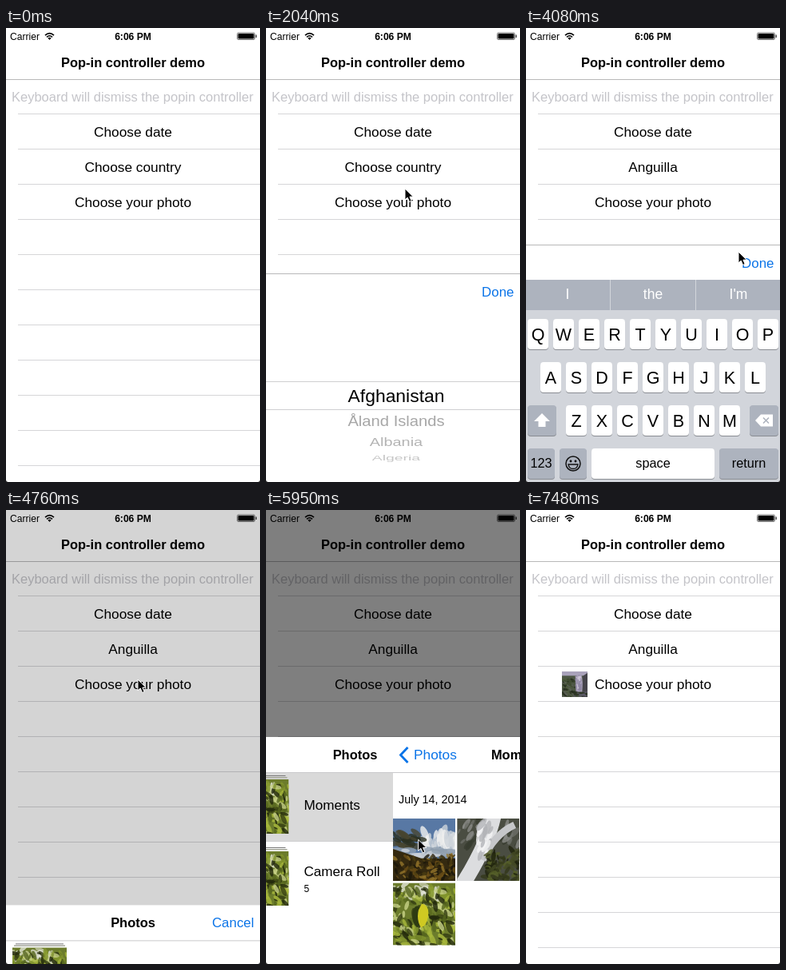
Write an HTML page that moves like this. It is 318x568 px and loops after 7650 ms.

```html
<!DOCTYPE html>
<html lang="en">
<head>
<meta charset="utf-8">
<title>Pop-in controller demo</title>
<style>
html, body { margin: 0; width: 100%; height: 100%; overflow: hidden; background: #fff; }
svg { display: block; width: 100vw; height: 100vh; font-family: "Liberation Sans", Arial, sans-serif; }
</style>
</head>
<body>
<svg id="stage" viewBox="0 0 318 568"></svg>
<script>
const W = 318, H = 568, LOOP = 7650, STEP = 170;
const BLUE = '#0b74e8', GREY = '#adb3be', RULE = '#cfcfd1', PRESSED = '#d9d9d9';

// Markup helpers
const rect = (x, y, w, h, fill, more = '') =>
  `<rect x="${x}" y="${y}" width="${w}" height="${h}" fill="${fill}" ${more}/>`;
const label = (s, x, y, size = 17.3, anchor = 'middle', fill = '#000', more = '') =>
  `<text x="${x}" y="${y}" font-size="${size}" text-anchor="${anchor}" fill="${fill}" ${more}>${s}</text>`;
const title = (s, y) => label(s, 159, y, 16.45, 'middle', '#000', 'font-weight="bold"');
const line = (x, y, color) => rect(x, y, W - x, 1, color);
const path = (d, fill, more = '') => `<path d="${d}" fill="${fill}" ${more}/>`;
const stroke = (d, color, width) => path(d, 'none', `stroke="${color}" stroke-width="${width}"`);
const circle = (x, y, r, more = '') => `<circle cx="${x}" cy="${y}" r="${r}" ${more}/>`;
const group = (id, body) => `<g id="${id}">${body}</g>`;
const count = (n, first) => Array.from({ length: n }, (_, i) => first + i);

// Photos: scattered leaves, rocks and streaks in a 78 x 78 box
let seed = 11;
const rand = () => (seed = (seed * 16807) % 2147483647) / 2147483647;
function scatter(n, colors, [x, y, w, h], r, tilt = 0, spread = 180) {
  return count(n, 0).map(i => {
    const cx = x + rand() * w, cy = y + rand() * h, rx = r * (.5 + rand());
    const turn = tilt + (rand() - .5) * spread;
    return `<ellipse rx="${rx}" ry="${rx * .4}" fill="${colors[i % colors.length]}" opacity=".8" ` +
      `transform="translate(${cx} ${cy}) rotate(${turn})"/>`;
  }).join('');
}
const PHOTOS = {
  river: () => rect(0, 0, 78, 78, '#5878a4') +
    scatter(30, ['#f0f0ef', '#cdd3da'], [38, 18, 40, 22], 8, 90, 60) +
    scatter(24, ['#2b2f20', '#47452f'], [0, 17, 34, 18], 7, 20, 40) +
    scatter(24, ['#c9d0d8', '#8f9eae'], [6, 39, 72, 8], 9, 0, 10) +
    path('M0 38L36 50H78V78H0Z', '#352a10') +
    scatter(110, ['#2a210c', '#6b4f16', '#4b3d12', '#94742a', '#1a170a'], [0, 46, 78, 32], 4),
  stream: () => rect(0, 0, 78, 78, '#4a4d42') +
    scatter(40, ['#6c6f68', '#383c30', '#8a8b88'], [0, 0, 78, 36], 6, 120, 40) +
    stroke('M46 -4Q38 34 6 84', '#dcdddf', 19) + stroke('M72 8Q46 20 32 52', '#c6c7ca', 9) +
    scatter(30, ['#f4f4f5', '#b3b4b8'], [28, 4, 14, 46], 7, 115, 30) +
    scatter(90, ['#33381a', '#1f220d', '#565f28', '#454b25'], [36, 40, 42, 38], 5),
  falls: () => rect(0, 0, 78, 78, '#4d5744') + rect(0, 0, 78, 13, '#a9a2ba') +
    stroke('M50 12Q55 34 52 64', '#a59cb6', 20) +
    scatter(34, ['#cfc8db', '#8f87a2'], [44, 18, 14, 36], 8, 90, 16) +
    path('M64 14L78 4V78H62Z', '#45444a') +
    scatter(80, ['#3f4b31', '#232b1b', '#4f5b3e', '#5d6158'], [0, 24, 38, 54], 6, 30, 50) +
    scatter(24, ['#2b3322', '#5d5a68'], [36, 62, 42, 16], 6, 10, 40),
  meadow: () => rect(0, 0, 78, 78, '#d9d8de') +
    scatter(40, ['#8d9086', '#6d7263'], [28, 34, 50, 10], 7, -10, 20) + rect(0, 46, 78, 32, '#4f5c2a') +
    scatter(130, ['#73843c', '#38431c', '#8d9650', '#6a4a2c'], [0, 44, 78, 36], 6, 85, 50) +
    stroke('M6 48L20 6M16 48L8 12M26 44L38 18', '#77786c', .8) +
    scatter(4, ['#f1f2df'], [50, 49, 4, 3], 5, 0, 20),
  leaves: () => rect(0, 0, 78, 78, '#6c7c2c') +
    scatter(26, ['#e2e4d8', '#c3c9a8'], [0, 0, 60, 18], 7) +
    scatter(190, ['#a9b93c', '#343d12', '#83952e', '#20260b', '#c9d287', '#55661f'], [0, 8, 78, 70], 6, 60, 120) +
    path('M25 34Q30 24 36 34Q38 50 30 56Q22 48 25 34Z', '#2e3b12') +
    path('M36 26Q46 28 44 42Q42 54 35 56Q29 46 32 34Z', '#cfc922')
};
const photo = (id, x, y, size) => `<use href="#${id}" x="${x}" y="${y}" width="${size}" height="${size}"/>`;

// Status bar, navigation bar and table
const base = () => label('Carrier', 5, 14.5, 12.1, 'start') +
  stroke('M49 9.2Q54.5 4.2 60 9.2M51 11.3Q54.5 8.2 58 11.3', '#000', 1.6) +
  path('M52.3 12.5Q54.5 11 56.7 12.5L54.5 15Z', '#000') +
  label('6:06 PM', 159, 14.5, 12.1, 'middle', '#000', 'font-weight="bold"') +
  rect(289.5, 6, 22, 8.5, '#fff', 'rx="1.5" stroke="#777"') +
  rect(290.5, 7, 20, 6.5, '#000', 'rx="1"') + rect(312.5, 8.5, 1.5, 3.5, '#555') +
  title('Pop-in controller demo', 48.5) + line(0, 64, '#b8b8b9') +
  label('Keyboard will dismiss the popin controller', 7, 92, 16.5, 'start', '#c4c4c9') +
  rect(0, 108, W, 43, PRESSED, 'id="press"') +
  count(11, 0).map(i => line(15, 107 + 44 * i, '#d6d6d8')).join('') +
  label('Choose date', 159, 136) + label('Choose country', 159, 180, 17.3, 'middle', '#000', 'id="country"') +
  label('Choose your photo', 159, 224) + group('chosen', photo('falls', 45, 202, 32));

// Rotating picker column, magnified inside the middle band
function wheel(items, pos, x, anchor = 'middle') {
  let small = '', big = '';
  items.forEach((s, i) => {
    const a = (i - pos) * .361, c = Math.cos(a), y = 87.7 * Math.sin(a);
    if (Math.abs(a) > 1.4) return;
    const size = 18.6 + 1.7 * c;
    small += label(s, 0, size * .36, size, anchor, '#999',
      `opacity="${.25 + .65 * c}" transform="translate(${x} ${153 + y}) scale(1 ${c})"`);
    big += label(s, x, 161.3 + y * 1.12, 22.9, anchor);
  });
  return `<g clip-path="url(#around)">${small}</g><g clip-path="url(#band)">${big}</g>`;
}

const panel = fill => rect(0, 0, W, 300, fill);
const toolbar = () => rect(0, 0, W, 44, '#fff') + line(0, 0, '#b8b8b9') + label('Done', 310.5, 29, 16.9, 'end', BLUE);

const MONTHS = ['April', 'May', 'June', 'July', 'August', 'September', 'October'];
const picker = () => panel('#fff') + toolbar() + line(0, 135, RULE) + line(0, 170, RULE) +
  group('dates', wheel(MONTHS, 3, 56, 'start') + wheel(count(7, 11), 3, 196, 'end') +
    wheel(count(7, 2011), 3, 272, 'end')) +
  group('countries', '');

function keyboard() {
  const cap = (x, y, w, fill) =>
    rect(x, y + 1, w, 38, '#898c92', 'rx="4"') + rect(x, y, w, 38, fill, 'rx="4"');
  const word = (s, x, w, fill) => cap(x, 255, w, fill) + label(s, x + w / 2, 279, 16.3);
  let out = panel('#d2d5db') + toolbar() + rect(0, 44, W, 38, GREY);
  ['I', 'the', "I'm"].forEach((s, i) => out += label(s, 52 + i * 107, 68, 17.5, 'middle', '#fff') +
    rect(105 + i * 107, 44, 1, 38, '#d2d5db'));
  ['QWERTYUIOP', 'ASDFGHJKL', 'ZXCVBNM'].forEach((keys, row) => {
    const left = 162 - keys.length * 16, y = 93 + row * 54;
    [...keys].forEach((k, i) => out += cap(left + i * 32, y, 26, '#fff') + label(k, left + 13 + i * 32, y + 27, 21.5));
  });
  return out + cap(2, 201, 36, GREY) + path('M20 211L30 221H24.5V228H15.5V221H10Z', '#fff') +
    cap(280, 201, 36, GREY) + path('M287 220L294 212.5H309V227.5H294Z', '#fff') +
    stroke('M297 216.5L304 223.5M304 216.5L297 223.5', GREY, 1.6) +
    word('123', 2, 34, GREY) + cap(42, 255, 34, GREY) +
    circle(59, 274, 9, 'fill="none" stroke="#111" stroke-width="1.5"') + circle(56, 271, 1.4) + circle(62, 271, 1.4) +
    stroke('M53 275H65Q64 280.5 59 280.5Q54 280.5 53 275Z', '#111', 1.3) +
    word('space', 82, 154, '#fff') + word('return', 242, 74, GREY);
}

const navBar = name => title(name, 28) + label('Cancel', 310.5, 28, 16.9, 'end', BLUE) + line(0, 44, '#c9c9cb');
const album = (name, y, textY) => rect(12, y - 5, 60, 1, '#777') + rect(10, y - 3, 64, 1.5, '#a5a79c') +
  photo('leaves', 8, y, 68) + label(name, 95, textY, 17.1, 'start') +
  stroke(`M296.5 ${y + 28}l6 6l-6 6`, '#c4c4c9', 2);

const albums = () => panel('#fff') + navBar('Photos') +
  rect(0, 45, W, 85, PRESSED, 'id="albumPress"') + album('Moments', 53, 91) + line(0, 130, RULE) +
  album('Camera Roll', 143, 174) + label('5', 95, 194, 12, 'start');

const moments = () => panel('#fff') + navBar('Moments') +
  stroke('M18.5 13l-9 9.5l9 9.5', BLUE, 2.8) + label('Photos', 26, 28, 17.3, 'start', BLUE) +
  label('July 14, 2014', 7, 83, 14.4, 'start') +
  Object.keys(PHOTOS).map((id, i) => photo(id, i % 4 * 80.2, 102 + 80.5 * Math.floor(i / 4), 78)).join('');

const stage = document.getElementById('stage');
const symbols = Object.entries(PHOTOS).map(([id, draw]) => `<symbol id="${id}" viewBox="0 0 78 78">${draw()}</symbol>`);
stage.innerHTML =
  `<defs>${symbols.join('')}
  <clipPath id="band">${rect(0, 136, W, 34, '#000')}</clipPath>
  <clipPath id="around">${rect(0, 45, W, 90, '#000')}${rect(0, 171, W, 90, '#000')}</clipPath></defs>` +
  rect(0, 0, W, H, '#fff') + base() + group('picker', picker()) + group('keyboard', keyboard()) +
  rect(0, 0, W, H, '#000', 'id="dim"') +
  group('photos', group('albums', albums()) + group('moments', moments())) +
  path('M0 566V568H2ZM318 566V568H316Z', '#444') +
  group('cursor', path('M0 0V14L3.2 11L5.6 16.5L8.2 15.4L5.9 10.1H10.3Z', '#000',
    'stroke="#fff" stroke-width="1" stroke-linejoin="round"'));
const el = {};
stage.querySelectorAll('g[id], rect[id], text[id]').forEach(n => el[n.id] = n);

// Motion
const SLIDE = 510;
const clamp = p => Math.min(1, Math.max(0, p));
const ease = p => p * p * (3 - 2 * p);
const ramp = (t, start, length = SLIDE) => clamp((t - start) / length);
const raised = (t, open, close) => ease(ramp(t, open)) - ease(ramp(t, close));
const within = (t, from, to) => t >= from && t < to;

// Pointer stops: time, x, y
const STOPS = [
  [340, 205, 330], [850, 163, 130], [1360, 163, 130], [2040, 174, 201], [2210, 180, 505],
  [2890, 191, 155], [3060, 180, 84], [3740, 180, 84], [4080, 266, 280], [4250, 285, 288],
  [4590, 165, 212], [5270, 165, 212], [5610, 184, 401], [6120, 194, 418], [6290, 206, 415]];
function pointer(t) {
  const i = STOPS.findIndex(s => s[0] > t);
  if (i < 1) return STOPS.at(i).slice(1);
  const [t0, x0, y0] = STOPS[i - 1], [t1, x1, y1] = STOPS[i], p = (t - t0) / (t1 - t0);
  return [x0 + (x1 - x0) * p, y0 + (y1 - y0) * p];
}

const COUNTRIES = ['Afghanistan', 'Åland Islands', 'Albania', 'Algeria', 'American Samoa', 'Andorra', 'Angola',
  'Anguilla', 'Antarctica', 'Antigua and Barbuda', 'Argentina', 'Armenia', 'Aruba'];
const TAPS = [850, 1700, 4590];
const ALBUM_TAP = 5780, PICKED = 6600;

const move = (node, x, y) => node.setAttribute('transform', `translate(${x} ${y})`);
const show = (node, on) => node.setAttribute('visibility', on ? 'visible' : 'hidden');

function render(t) {
  move(el.picker, 0, H - 261 * raised(t, TAPS[0], 2890));
  move(el.keyboard, 0, H - 297 * raised(t, 3230, 4250));
  move(el.photos, 0, H - 284 * raised(t, TAPS[2], PICKED));
  el.dim.setAttribute('opacity', .5 * (ramp(t, TAPS[2]) - ramp(t, PICKED)));

  const push = ease(ramp(t, ALBUM_TAP, 2 * STEP));
  move(el.albums, -95 * push, 0);
  move(el.moments, W * (1 - push), 0);

  const list = t >= TAPS[1] + STEP;
  show(el.dates, !list);
  el.countries.innerHTML = list ? wheel(COUNTRIES, 7 * ease(ramp(t, 2210)), 163) : '';
  el.country.textContent = t >= 2720 ? 'Anguilla' : 'Choose country';
  show(el.chosen, t >= PICKED);

  const row = TAPS.findIndex(s => within(t, s, s + STEP));
  show(el.press, row >= 0);
  el.press.setAttribute('y', 108 + 44 * Math.max(row, 0));
  show(el.albumPress, within(t, ALBUM_TAP, ALBUM_TAP + 2 * STEP));

  show(el.cursor, within(t, 340, 7480));
  move(el.cursor, ...pointer(t));
}

let last = -1;
function tick() {
  const t = Math.floor(performance.now() % LOOP / STEP) * STEP;
  if (t !== last) render(last = t);
  requestAnimationFrame(tick);
}
tick();
</script>
</body>
</html>
```
